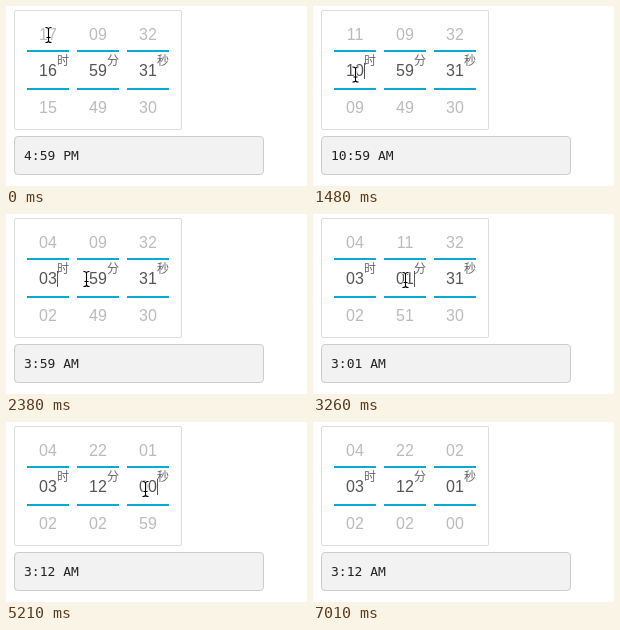
An HTML page for the animation above (7160 ms loop, 301 by 180 pixels).

```html
<!DOCTYPE html>
<html lang="zh">
<head>
<meta charset="utf-8">
<title>Time picker</title>
<style>
  html, body { margin: 0; width: 100%; height: 100%; overflow: hidden; background: #fff; }
  svg { display: block; width: 100vw; height: 100vh; }
  .digit { font: 16px "Liberation Sans", Arial, sans-serif; text-anchor: middle; }
  .unit { font: 12px "Noto Sans CJK SC", "Noto Sans CJK", sans-serif; fill: #666; }
  .near { fill: #bbb; }
  .now { fill: #555; }
  .out { font: 13px "DejaVu Sans Mono", monospace; fill: #222; }
</style>
</head>
<body>
<svg id="stage" viewBox="0 0 301 180">
  <rect x="8.5" y="4.5" width="167" height="119" rx="1.5" fill="#fff" stroke="#ddd"/>
  <rect x="8.5" y="130.5" width="249" height="38" rx="3.5" fill="#f2f2f2" stroke="#ccc"/>
  <g id="wheels"></g>
  <text id="out" class="out" x="18" y="154"></text>
  <g id="beam" fill="none" stroke-linecap="square">
    <path d="M-2.5 -7.5Q0 -7.5 0 -5.5Q0 -7.5 2.5 -7.5M0 -5.5V5.5M-2.5 7.5Q0 7.5 0 5.5Q0 7.5 2.5 7.5M-1.5 2.5H1.5" stroke="#fff" stroke-width="2.6"/>
    <path d="M-2.5 -7.5Q0 -7.5 0 -5.5Q0 -7.5 2.5 -7.5M0 -5.5V5.5M-2.5 7.5Q0 7.5 0 5.5Q0 7.5 2.5 7.5M-1.5 2.5H1.5" stroke="#000" stroke-width="1.1"/>
  </g>
  <g id="hand" stroke="#000" stroke-width="1.2" stroke-linejoin="round">
    <path d="M5.5 18V16L3 12.5L.8 9C0 7.3 2 6.4 3.2 7.7L5 9.8L2.9 3.2C2.4 1 4.9 .4 5.7 2.3L7.3 6.5C8 5.2 9.9 5.4 10.2 6.9C11 6 12.6 6.4 12.8 7.8C14 7.2 15.2 8 15.2 9.6C15.2 12.2 14.6 13.4 13.5 15.5V18Z" fill="#fff"/>
    <path d="M7.6 12.5V15.5M9.6 12.5V15.5M11.6 12.5V15.5" fill="none" stroke-width=".9"/>
  </g>
  <path id="arrow" d="M.5 .5V14.5L3.8 11.5L6 16.5L8.2 15.5L6.1 10.8H10.5Z" fill="#000" stroke="#fff"/>
</svg>
<script>
const LOOP = 7160;
const NS = "http://www.w3.org/2000/svg";
const $ = id => document.getElementById(id);
const pad = n => String(n).padStart(2, "0");

function add(tag, attrs, text = "") {
  const el = document.createElementNS(NS, tag);
  for (const key in attrs) el.setAttribute(key, attrs[key]);
  el.textContent = text;
  return $("wheels").appendChild(el);
}

function show(el, on) {
  el.setAttribute("visibility", on ? "visible" : "hidden");
}

function makeWheel(unit, i, count, step) {
  const x = 21 + 50 * i;
  const digit = (y, cls) => add("text", { class: "digit " + cls, x: x + 21, y });
  for (const y of [44, 82]) add("rect", { x, y, width: 42, height: 2, fill: "#0aa9d2" });
  const mark = add("rect", { x: x + 12, y: 55, width: 18, height: 18, fill: "#b4d5fe" });
  const digits = [digit(33.5, "near"), digit(70, "now"), digit(107, "near")];
  add("text", { class: "unit", x: x + 30, y: 59 }, unit);
  const caret = add("rect", { x: x + 30, y: 57, width: 1, height: 16, fill: "#555" });
  return (value, marked, focused) => {
    digits.forEach((el, k) => {
      el.textContent = pad((value + (1 - k) * step + count) % count);
    });
    show(mark, marked);
    show(caret, focused);
  };
}

const wheels = [
  makeWheel("时", 0, 24, 1),
  makeWheel("分", 1, 60, 10),
  makeWheel("秒", 2, 60, 1)
];

// Each entry changes part of the state: time values, pointer, marked wheel, caret wheel.
const steps = [
  [0, { h: 16, m: 59, s: 31, kind: "beam", at: [42.5, 29], mark: -1, caret: -1 }],
  [300, { at: [42.5, 46] }],
  [450, { at: [42.5, 62] }],
  [590, { at: [42.5, 68.5], caret: 0 }],
  [740, { mark: 0, caret: -1 }],
  [1180, { h: 14, mark: -1, caret: 0 }],
  [1330, { h: 12 }],
  [1480, { h: 10 }],
  [1630, { h: 8 }],
  [1780, { h: 7 }],
  [1930, { h: 5 }],
  [2080, { h: 3 }],
  [2230, { at: [58.5, 74.5] }],
  [2380, { at: [80.5, 65] }],
  [2520, { at: [90.5, 66] }],
  [2670, { at: [92.5, 66], caret: 1 }],
  [2810, { mark: 1, caret: -1 }],
  [3260, { m: 1, mark: -1, caret: 1 }],
  [3410, { m: 12 }],
  [3860, { at: [110.5, 74.5] }],
  [4010, { at: [132.5, 70] }],
  [4160, { at: [139.5, 67], caret: 2 }],
  [4310, { mark: 2, caret: -1 }],
  [5210, { s: 0, mark: -1, caret: 2 }],
  [5510, { s: 1 }],
  [5810, { at: [153.5, 77] }],
  [5960, { kind: "hand", at: [156, 78.5], caret: -1 }],
  [6260, { kind: "arrow", at: [172, 98] }],
  [6410, { at: [196, 120], caret: 2 }],
  [6560, { at: [220, 142] }],
  [6710, { at: [237, 160] }],
  [6860, { at: [245, 172] }],
  [7010, { kind: "", caret: -1 }]
];

function stateAt(t) {
  return Object.assign({}, ...steps.filter(([start]) => start <= t).map(([, change]) => change));
}

function render(t) {
  const { h, m, s, kind, at, mark, caret } = stateAt(t);
  [h, m, s].forEach((value, i) => wheels[i](value, mark === i, caret === i));
  $("out").textContent = `${h % 12 || 12}:${pad(m)} ${h < 12 ? "AM" : "PM"}`;
  for (const id of ["beam", "hand", "arrow"]) {
    show($(id), id === kind);
    $(id).setAttribute("transform", `translate(${at})`);
  }
}

const begin = performance.now();
function tick() {
  render((performance.now() - begin) % LOOP);
  requestAnimationFrame(tick);
}
tick();
</script>
</body>
</html>
```
